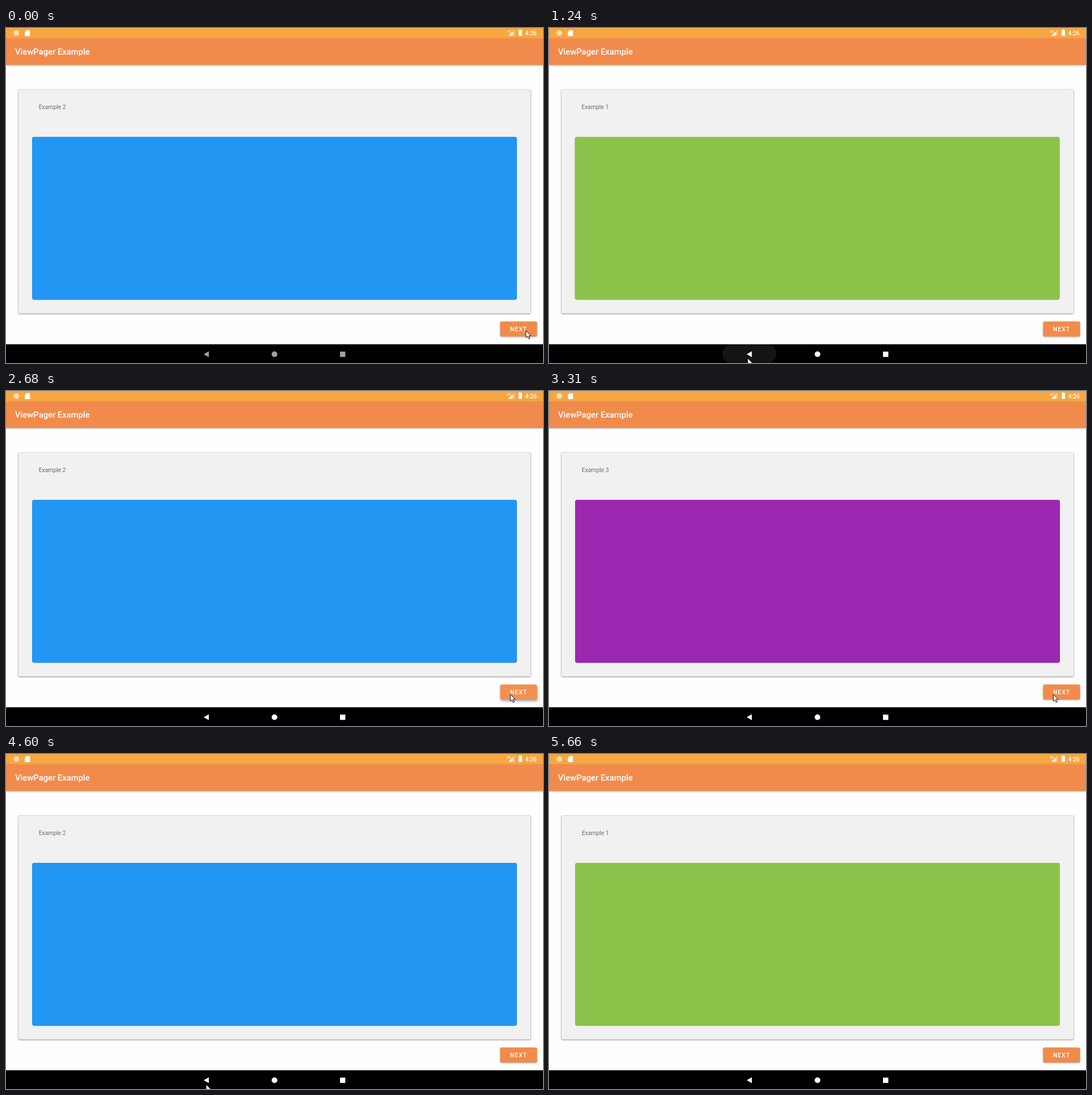
An HTML page that plays this animation: 947x591 px, repeating every 6450 ms.

```html
<!DOCTYPE html>
<html lang="en">
<head>
<meta charset="utf-8">
<title>ViewPager Example</title>
<style>
  html, body { margin: 0; width: 100%; height: 100%; overflow: hidden; background: #fefefe; }
  svg { display: block; width: 947px; height: 591px; font-family: Roboto, sans-serif; }
  .medium { font-weight: 500; fill: #fff; }
  .bar { filter: drop-shadow(0 1.3px 1.3px rgba(0, 0, 0, .3)); }
  .card { filter: drop-shadow(0 1.5px 1px rgba(0, 0, 0, .28)) drop-shadow(0 .3px 1.3px rgba(0, 0, 0, .35)); }
  .panel { filter: drop-shadow(0 .6px .6px rgba(0, 0, 0, .3)); }
</style>
</head>
<body>
<svg viewBox="0 0 947 591">
  <defs>
    <clipPath id="cardClip"><rect x="22" y="109" width="903" height="394.5" rx="1.5"/></clipPath>
    <clipPath id="navClip"><rect y="558" width="947" height="33"/></clipPath>
  </defs>
  <rect width="947" height="591" fill="#fefefe"/>

  <rect class="bar" width="947" height="65.2" fill="#f18b4b"/>
  <rect width="947" height="18" fill="#f5a742"/>
  <text class="medium" x="16" y="47" font-size="14.8">ViewPager Example</text>

  <g fill="#fff">
    <circle cx="18.5" cy="9" r="5.2" opacity=".45"/>
    <circle cx="17.6" cy="8.2" r="4" opacity=".3"/>
    <path d="M36.4 3.7H41.3Q42.3 3.7 42.3 4.7V13.3Q42.3 14.3 41.3 14.3H34.3Q33.3 14.3 33.3 13.3V6.8Z"/>
    <path d="M886 13.6H897V3Z" opacity=".4"/>
    <path d="M886 13.6H893.3V6.6Z"/>
    <text x="883.2" y="8" font-size="5.5" font-weight="500">US</text>
    <path d="M905.7 2.5H908.3V3.6H910V13.7H904V3.6H905.7Z"/>
  </g>
  <text class="medium" x="915.6" y="13" font-size="10.36">4:26</text>

  <rect class="card" x="22" y="109" width="903" height="394.5" rx="1.5" fill="#f1f1f1"/>
  <g clip-path="url(#cardClip)"><g id="pages"></g></g>

  <rect id="button" x="871.4" y="517.7" width="65.1" height="26.6" rx="2.8" fill="#f18b4b"/>
  <rect id="buttonRipple" x="871.4" y="517.7" width="65.1" height="26.6" rx="2.8" fill="#fff"/>
  <text class="medium" x="889.1" y="535" font-size="10.36" letter-spacing=".92">NEXT</text>

  <rect y="558" width="947" height="33"/>
  <g clip-path="url(#navClip)"><rect id="backRipple" y="557.5" height="34.5" rx="17" fill="#fff"/></g>
  <g id="navIcons" fill="#fff">
    <path d="M348.8 575.5L357.7 570.3V580.7Z"/>
    <circle cx="473.5" cy="575.5" r="5"/>
    <rect x="589" y="570.9" width="9.4" height="9.4"/>
  </g>
  <path id="cursor" d="M0 0V12.3L2.9 9.7L5 14.6L7 13.7L4.9 9H8.7Z" fill="#fff" stroke="#000" stroke-width=".9"/>
</svg>
<script>
const LOOP = 6450, PAGE_WIDTH = 903, SLIDE_MS = 200, CURSOR_GONE = 5660;
const el = id => document.getElementById(id);
const set = (id, attributes) => {
  for (const [name, value] of Object.entries(attributes)) el(id).setAttribute(name, value);
};

// Each tap starts a slide to another page.
const taps = [
  { at: 1065, button: "back", page: 0 },
  { at: 2250, button: "next", page: 1 },
  { at: 2760, button: "next", page: 2 },
  { at: 4321, button: "back", page: 1 },
  { at: 4942, button: "back", page: 0 }
];
const FIRST_PAGE = 1;

const onNext = [889.3, 535], onBack = [353, 583];
const moves = [
  { start: 40, end: 500, from: [917, 534], to: [350.3, 582.5], bow: 0 },
  { start: 1215, end: 1690, from: [350.3, 582.5], to: onNext, bow: 25 },
  { start: 3330, end: 3830, from: onNext, to: onBack, bow: 0 }
];

const mix = (a, b, p) => a + (b - a) * p;
const ramp = (t, start, end) => Math.min(Math.max((t - start) / (end - start), 0), 1);
const smoother = p => p ** 3 * (10 - 15 * p + 6 * p * p);
const strongest = (button, t, shape) =>
  Math.max(...taps.filter(tap => tap.button === button).map(tap => shape(t - tap.at)));

function recorded(time) {
  const split = 1900, step = time < split ? split / 14 : 127.5;
  return split + Math.floor((time - split) / step) * step;
}

function scrollAt(t) {
  let page = FIRST_PAGE;
  for (const tap of taps) {
    const rest = 1 - ramp(t, tap.at, tap.at + SLIDE_MS);
    page = mix(page, tap.page, 1 - rest ** 5);
  }
  return page;
}

function cursorAt(t) {
  const move = moves.findLast(m => m.start <= t) ?? moves[0];
  const p = smoother(ramp(t, move.start, move.end));
  const [x, y] = move.from.map((value, axis) => mix(value, move.to[axis], p));
  return [x, y - move.bow * Math.sin(Math.PI * p)];
}

// Idle navigation icons dim, and a tap on back lights them up again.
function iconsAt(t) {
  const early = t < 2000;
  const idle = early ? .63 : mix(1, .76, ramp(t, 3870, 4190));
  const wake = early ? 935 : 4190;
  return mix(idle, 1, ramp(t, wake, wake + 250));
}

const backGlow = u => .2 * ramp(u, -130, 20) * ramp(u, 240, 30);
const buttonLift = u => ramp(u, -260, -100) * ramp(u, 110, 0);
const buttonShine = u => .04 * ramp(u, -260, -100) * ramp(u, 540, 0);

el("pages").innerHTML = ["#8bc34a", "#2196f3", "#9c27b0"].map((color, i) => `
  <g transform="translate(${i * PAGE_WIDTH})">
    <text x="57.7" y="143" font-size="10.36" fill="#6d6d6d">Example ${i + 1}</text>
    <rect class="panel" x="46" y="192" width="855" height="287.6" rx="4" fill="${color}"/>
  </g>`).join("");

function draw(time) {
  const t = recorded(time);
  set("pages", { transform: `translate(${-scrollAt(t) * PAGE_WIDTH})` });
  set("cursor", {
    transform: `translate(${cursorAt(t)})`,
    visibility: time < CURSOR_GONE ? "visible" : "hidden"
  });

  const width = mix(91, 95, strongest("back", t, u => ramp(u, 30, 150) * ramp(u, 300, 290)));
  set("backRipple", { opacity: strongest("back", t, backGlow), width, x: 353.4 - width / 2 });
  set("navIcons", { opacity: iconsAt(t) });

  const lift = strongest("next", t, buttonLift);
  el("button").style.filter =
    `drop-shadow(${lift}px ${1 + 2 * lift}px ${1.2 + lift}px rgba(0, 0, 0, .35))`;
  set("buttonRipple", { opacity: strongest("next", t, buttonShine) });
}

const begin = performance.now();
function tick() {
  draw((performance.now() - begin) % LOOP);
  requestAnimationFrame(tick);
}
tick();
</script>
</body>
</html>
```
